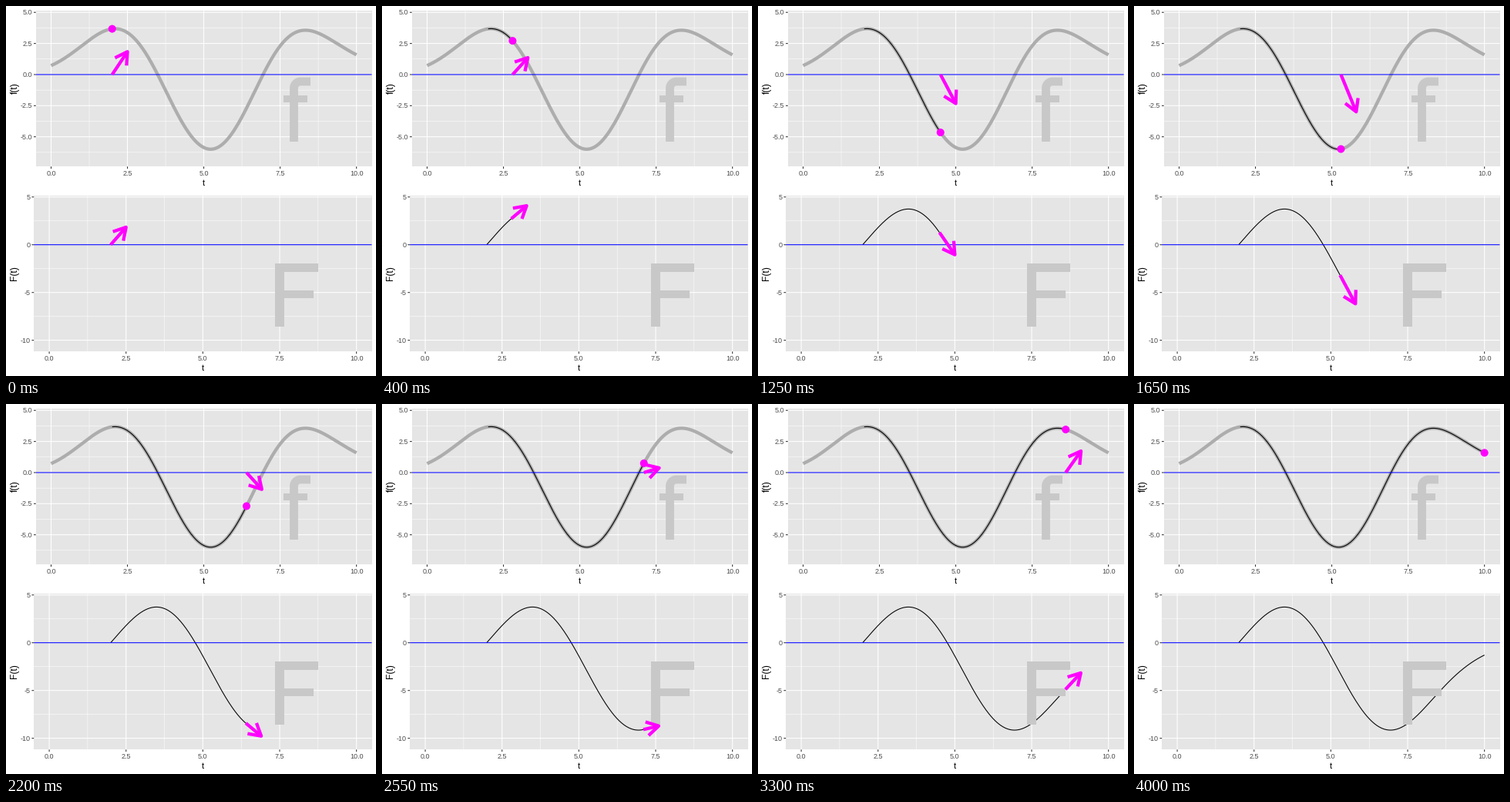
Recreate the animation shown at these times as a matplotlib script. Size 480x480 px, loop 4.05 s.

```python
import numpy as np
import matplotlib.pyplot as plt
from matplotlib.animation import FuncAnimation
from matplotlib.patches import Circle, Rectangle

SIZE, DPI = 480, 72
FRAMES, STEP_MS = 81, 50
START, END, DT, AHEAD = 2.0, 10.0, 0.1, 0.5
RIGHT = 474.5
PINK, LETTER = "#ff00ff", "#c8c8c8"

plt.rcParams["font.family"] = "Liberation Sans"


def f(t):
    """A well around t = 5.2 between two humps, fading outwards."""
    s = t - 5.215
    u = s * s
    fade = 0.01 * s - 0.2047 * u - 0.00312 * s**3 + 0.00046 * u**2 + 0.000158 * s**5
    return (u - 2.976) * (2.016 + 0.18 * u) * np.exp(fade)


fine = np.linspace(START, END, 1601)
area = (f(fine[1:]) + f(fine[:-1])) / 2 * (fine[1] - fine[0])
total = np.concatenate([[0], np.cumsum(area)])


def F(t):
    """Integral of f from START to t."""
    return np.interp(t, fine, total)


fig = plt.figure(figsize=(SIZE / DPI, SIZE / DPI), dpi=DPI, facecolor="white")
ax = fig.add_axes([0, 0, 1, 1])
ax.set_xlim(0, SIZE)
ax.set_ylim(SIZE, 0)
ax.axis("off")


def line(x, y, color, width, z, join="round"):
    return ax.plot(x, y, color=color, lw=width, zorder=z, snap=False,
                   solid_capstyle="butt", solid_joinstyle=join)[0]


def box(x, y, w, h, color, z):
    ax.add_patch(Rectangle((x, y), w, h, fc=color, ec="none", zorder=z))


class Panel:
    """A grey plot panel, drawn in stage pixels."""

    def __init__(self, left, top, x0, y0, yunit, ymax, ystep, nticks, yfmt, title):
        self.x0, self.xunit = x0, (454.65 - x0) / END
        self.y0, self.yunit = y0, yunit
        bottom = top + 202.8
        box(left, top, RIGHT - left, bottom - top, "#e5e5e5", 0)

        label = dict(fontsize=9, color="#4d4d4d", va="baseline")
        for t in np.arange(0, END + 1, 2.5):
            x, mid = self.x(t), self.x(t + 1.25)
            if t < END:
                line([mid, mid], [top, bottom], "white", 0.53, 1)
            line([x, x], [top, bottom], "white", 1.07, 1.5)
            line([x, x], [bottom, bottom + 2.75], "#333333", 1.07, 1.5)
            ax.text(x, bottom + 11.4, f"{t:.1f}", ha="center", **label)
        for k in range(nticks):
            v = ymax - k * ystep
            y, mid = self.y(v), self.y(v - ystep / 2)
            if mid < bottom and k < nticks - (yfmt == ".0f"):
                line([left, RIGHT], [mid, mid], "white", 0.53, 1)
            line([left, RIGHT], [y, y], "white", 1.07, 1.5)
            line([left - 2.75, left], [y, y], "#333333", 1.07, 1.5)
            ax.text(left - 4.4, y + 3.2, format(v, yfmt), ha="right", **label)

        ax.text((left + RIGHT) / 2, bottom + 24.8, "t", fontsize=11,
                ha="center", va="baseline")
        ax.text(14.5, (top + bottom) / 2, title, fontsize=12, rotation=90,
                rotation_mode="anchor", ha="center", va="baseline")
        line([left, RIGHT], [y0, y0], "blue", 1.07, 4)

        self.trace = line([], [], "black", 1.07, 3)
        self.shaft = line([], [], PINK, 4.27, 6)
        self.head = line([], [], PINK, 4.27, 6)

    def x(self, t):
        return self.x0 + self.xunit * t

    def y(self, v):
        return self.y0 - self.yunit * v

    def draw_trace(self, func, t):
        ts = np.linspace(START, t, 200)
        self.trace.set_data(self.x(ts), self.y(func(ts)))

    def draw_arrow(self, t, base, slope):
        shown = t + AHEAD < END + 1e-9
        self.shaft.set_visible(shown)
        self.head.set_visible(shown)
        x, y = self.x(t), self.y(base)
        tx, ty = self.x(t + AHEAD), self.y(base + AHEAD * slope)
        back = np.arctan2(y - ty, x - tx)
        barbs = back + np.array([1, 0, -1]) * np.pi / 6
        reach = np.array([18, 0, 18])
        self.shaft.set_data([x, tx], [y, ty])
        self.head.set_data(tx + reach * np.cos(barbs), ty + reach * np.sin(barbs))


upper = Panel(38.8, 5.5, 58.5, 88.95, 16.14, 5, 2.5, 5, ".1f", "f(t)")
lower = Panel(36.2, 245.5, 56.1, 309.7, 12.39, 5, 5, 4, ".0f", "F(t)")

ts = np.linspace(0, END, 400)
line(upper.x(ts), upper.y(f(ts)), "#adadad", 4.27, 2)

# Letter f: a hooked stroke and a crossbar
turn = np.linspace(np.pi, 1.5 * np.pi, 20)
hook_x, hook_y = 382 + 8.5 * np.cos(turn), 106.5 + 8.5 * np.sin(turn)
line([373.5, *hook_x, 395], [176, *hook_y, 98], LETTER, 10.8, 5)
box(360, 116, 31, 9, LETTER, 5)

# Letter F: a stem and two bars
box(349, 334, 12, 82, LETTER, 5)
box(349, 334, 56, 11, LETTER, 5)
box(349, 369, 50, 10, LETTER, 5)

dot = ax.add_patch(Circle((0, 0), 5, fc=PINK, ec="none", zorder=7))


def update(i):
    t = START + DT * i
    upper.draw_trace(f, t)
    lower.draw_trace(F, t)
    upper.draw_arrow(t, 0, f(t))
    lower.draw_arrow(t, F(t), f(t))
    dot.center = upper.x(t), upper.y(f(t))


anim = FuncAnimation(fig, update, frames=FRAMES, init_func=lambda: update(0),
                     interval=STEP_MS, repeat=True, repeat_delay=0)
plt.show()
```
